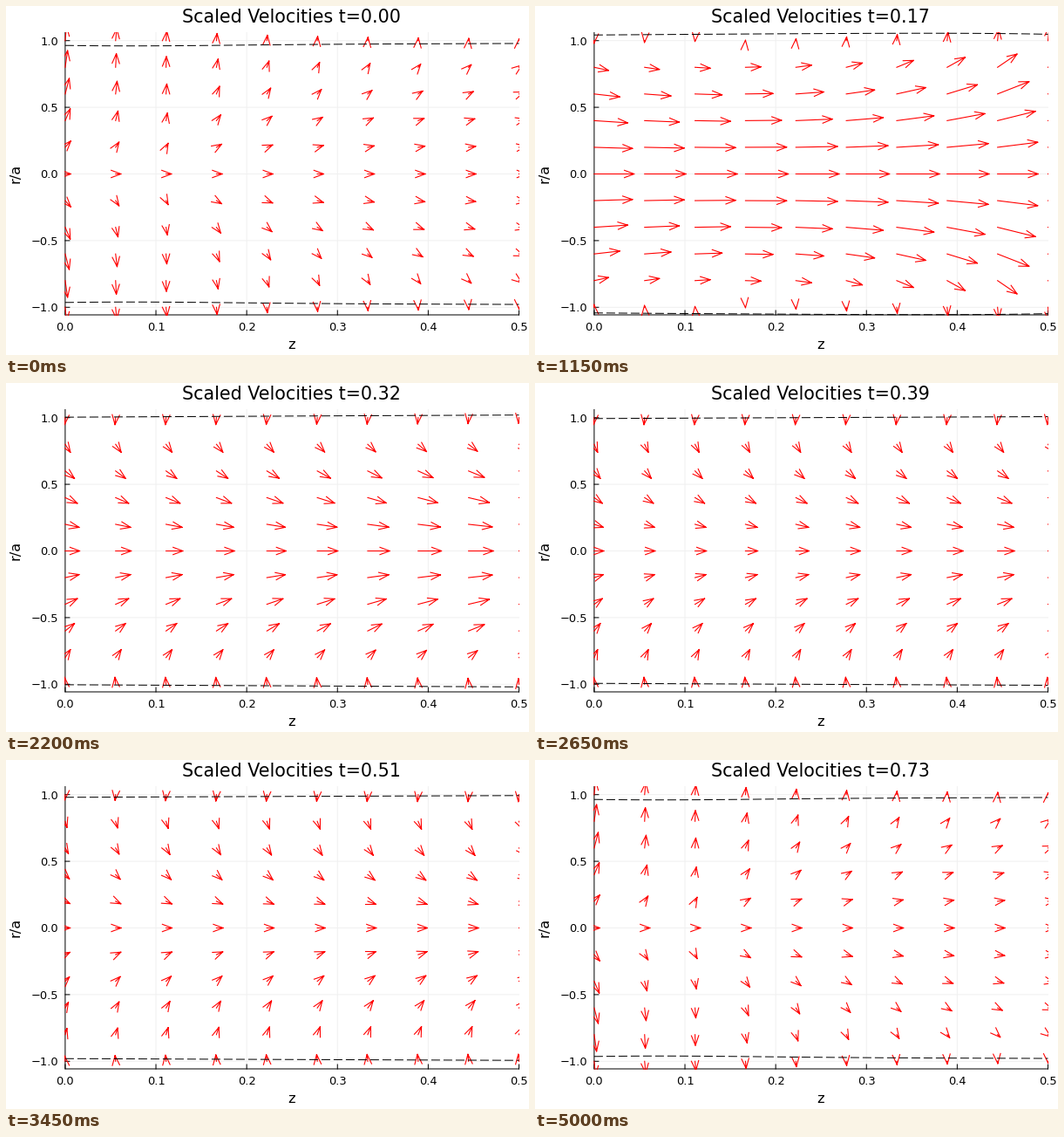
Recreate the animation shown at these times as a matplotlib script. Size 600 by 400 pixels, loop 5050 ms.

```python
import numpy as np
import matplotlib.pyplot as plt
from matplotlib.animation import FuncAnimation
from matplotlib.patches import Rectangle

W, H, DPI = 600, 400, 100
FRAMES, PERIOD, SPEED = 101, 0.733, 5.0
LEFT, RIGHT, TOP, BOTTOM = 67.9, 588.5, 30.5, 354
MID, UNIT = 192.5, 152.8
HEAD, HALF = 11.2, 4.2

plt.rcParams["font.family"] = "DejaVu Sans"


def px(size):
    return size * 72 / DPI


def bump(t, centre, width, power=2):
    return np.exp(-np.abs((t - centre) / width) ** power)


def rise(t, centre, width):
    return 0.5 + 0.5 * np.tanh((t - centre) / width)


def periodic(shape):
    """Add up the same beat from the neighbouring cycles."""
    return lambda t: sum(shape(t % PERIOD + k * PERIOD) for k in (-1, 0, 1))


# One heartbeat: a steep upstroke near t = 0.04, then a slow run-off.
@periodic
def axial_beat(t):
    return 50 * rise(t, 0.037, 0.022) * bump(t, 0.09, 0.17) + 4 * bump(t, 0.35, 0.1)


@periodic
def radial_beat(t):
    return 22 * bump(t, 0.035, 0.06) - 12.8 * bump(t, 0.36, 0.22, 4)


@periodic
def wall_beat(t):
    upstroke = rise(t, 0.045, 0.03) * np.exp(-t / 0.245)
    return 0.158 * upstroke - 0.012 * bump(t, -0.012, 0.035)


@periodic
def plug_beat(t):
    return 2.5 * bump(t, 0.04, 0.04) - 2.2 * bump(t, -0.017, 0.014)


zs, rs = np.meshgrid(np.linspace(0, 0.5, 10), np.linspace(-1, 1, 11))
wall_z = np.linspace(0, 0.5, 120)


def damping(z):
    return 1 - 0.5 * z


def sx(z):
    return LEFT + z * (RIGHT - LEFT) / 0.5


def sy(r):
    return MID - r * UNIT


def velocities(t):
    phase = t - zs / SPEED
    centre = 20 + damping(zs) * (axial_beat(phase) - 14.7)
    swell = 3.5 + radial_beat(phase)
    u = swell * (rs - 0.55 * rs ** 3) / 0.518
    w = centre * (1 - np.abs(rs) ** (2 + plug_beat(phase)))
    return w + 0.08 * swell * np.abs(rs) ** 20, u


def arrows(t):
    """One broken line holding every shaft and open head."""
    w, u = velocities(t)
    x0, y0 = sx(zs).ravel(), sy(rs).ravel()
    dx, dy = w.ravel(), -u.ravel()
    norm = np.hypot(dx, dy) + 1e-9
    ex, ey = dx / norm, dy / norm
    x1, y1 = x0 + dx, y0 + dy
    bx, by = x1 - HEAD * ex, y1 - HEAD * ey
    gap = np.full_like(x0, np.nan)
    xs = [x0, x1, gap, bx - HALF * ey, x1, bx + HALF * ey, gap]
    ys = [y0, y1, gap, by + HALF * ex, y1, by - HALF * ex, gap]
    return np.column_stack(xs).ravel(), np.column_stack(ys).ravel()


fig = plt.figure(figsize=(W / DPI, H / DPI), dpi=DPI, facecolor="white")
ax = fig.add_axes([0, 0, 1, 1])
ax.set(xlim=(0, W), ylim=(H, 0))
ax.axis("off")

frame_box = Rectangle((67, 30), 522, 325, transform=ax.transData, fill=False, lw=0)
ax.add_patch(frame_box)


def stroke(xs, ys, color="black", width=1, **kw):
    return ax.plot(xs, ys, color=color, lw=px(width), snap=False, **kw)[0]


def label(x, y, text, size, **kw):
    return ax.text(x, y, text, fontsize=px(size), **kw)


for i in range(6):
    x = sx(i / 10)
    if 0 < i < 5:
        stroke([x, x], [TOP, BOTTOM], "#f0f0f0", zorder=1)
    stroke([x, x], [BOTTOM, BOTTOM - 5], zorder=1.5)
    label(x, 372, f"{i / 10:.1f}", 13, ha="center", va="baseline")

for r in (-1, -0.5, 0, 0.5, 1):
    y = sy(r)
    stroke([LEFT, RIGHT], [y, y], "#f0f0f0", zorder=1)
    stroke([LEFT, LEFT + 5], [y, y], zorder=1.5)
    label(60, y + 4.9, f"{r:.1f}".replace("-", "\u2212"), 13,
          ha="right", va="baseline")

stroke([LEFT, LEFT, RIGHT], [TOP, BOTTOM, BOTTOM], zorder=1.5)
label(328, 392.7, "z", 16.3, ha="center", va="baseline")
label(11.5, MID - 0.7, "r/a", 16.3, ha="center", va="center", rotation=90)
title = label(327.8, 19.3, "", 20.7, ha="center", va="baseline")

field = stroke([], [], "red", 1.1, zorder=2, solid_joinstyle="round")
walls = [stroke([], [], zorder=3, linestyle=(0, (10, 4)), dash_capstyle="butt")
         for _ in range(2)]
for line in [field, *walls]:
    line.set_clip_path(frame_box)


def draw(n):
    t = n * PERIOD / (FRAMES - 1)
    title.set_text(f"Scaled Velocities t={t:.2f}")
    field.set_data(*arrows(t))
    edge = 1 + damping(wall_z) * (wall_beat(t - wall_z / SPEED) - 0.041)
    for line, side in zip(walls, (1, -1)):
        line.set_data(sx(wall_z), sy(side * edge))
    return [title, field, *walls]


anim = FuncAnimation(fig, draw, frames=FRAMES, init_func=lambda: draw(0),
                     interval=50, repeat=True, repeat_delay=0, blit=False)
plt.show()
```
